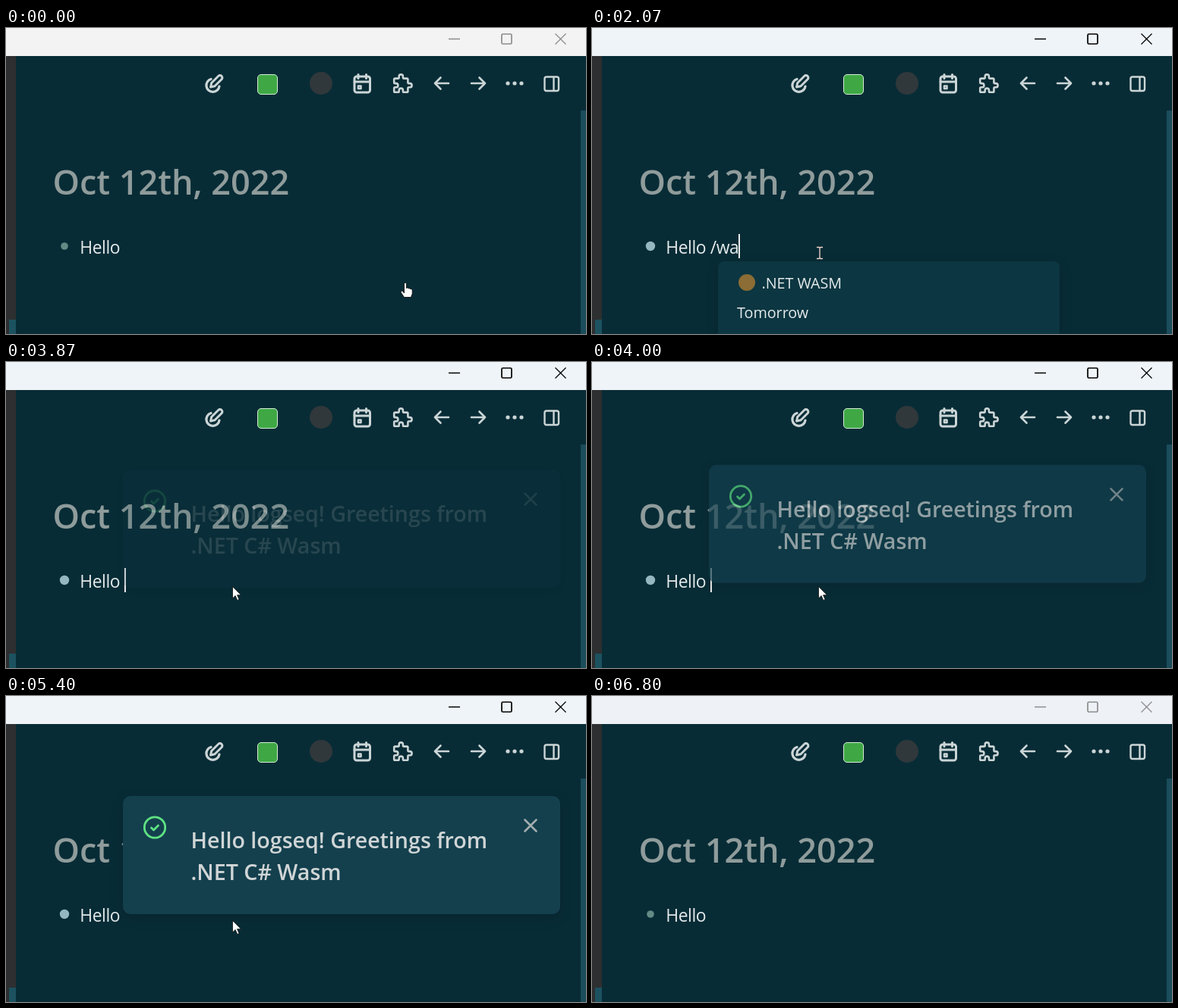
An HTML page for the animation above (6.87 s loop, 764 by 404 pixels).

```html
<!DOCTYPE html>
<html lang="en">
<head>
<meta charset="utf-8">
<title>Slash command</title>
<style>
  html, body { margin: 0; width: 100%; height: 100%; overflow: hidden; background: #082c36; }
  svg { display: block; width: 764px; height: 404px; }
  text { font-family: "Open Sans", "Noto Sans", sans-serif; white-space: pre; }
  .line { fill: none; stroke-linecap: round; stroke-linejoin: round; }
  #buttons { fill: none; stroke-width: 1.3; }
  #tools { stroke: #cbd5d6; stroke-width: 2.6; }
  #title { font-size: 45.1px; font-weight: 600; fill: #8f9c9b; }
  #typed { font-size: 22.8px; letter-spacing: -.4px; fill: #e4ebec; }
  #menu { filter: drop-shadow(0 5px 8px rgba(0, 0, 0, .16)); }
  #menu text { font-size: 19.7px; fill: #e4ebec; }
  #toast { filter: drop-shadow(0 5px 8px rgba(0, 0, 0, .16)); }
  #toast text { font-size: 28.6px; font-weight: 640; fill: #d0d5d6; }
</style>
</head>
<body>
<svg viewBox="0 0 764 404">
  <rect width="764" height="404" fill="#082c36"/>
  <rect y="37" width="13" height="367" fill="#2e2f30"/>
  <rect x="4" y="385" width="9" height="19" fill="#1c5260"/>
  <rect x="757" y="109" width="7" height="295" fill="#1b4d5c"/>
  <rect id="bar" width="764" height="37"/>
  <g id="buttons">
    <path d="M583 14.5h15M723.5 7.5l14 14m0-14l-14 14"/>
    <rect x="653" y="8" width="13" height="13" rx="1.5" stroke-width="1.700"/>
  </g>

  <g id="tools" class="line">
    <path d="M270 67.500a8.600 8.600 0 1 0 11 9.500" stroke-width="3.200"/>
    <path d="M269.500 78l1.200-5.500 9-9a2.800 2.800 0 0 1 4.300 4.300l-9 9z" stroke-width="3"/>
    <rect x="459" y="64" width="20.500" height="21" rx="3" stroke-width="3"/>
    <path d="M464 61.500v5M474.500 61.500v5M459 71h20.500" stroke-width="3"/>
    <rect x="464" y="76.500" width="3.500" height="3.500"/>
    <g transform="translate(507.300 57.500) scale(1.3)" stroke-width="2">
      <path d="M4 7h3a1 1 0 0 0 1-1v-1a2 2 0 0 1 4 0v1a1 1 0 0 0 1 1h3a1 1 0 0 1 1 1v3a1 1 0 0 0 1 1h1a2 2 0 0 1 0 4h-1a1 1 0 0 0-1 1v3a1 1 0 0 1-1 1h-3a1 1 0 0 1-1-1v-1a2 2 0 0 0-4 0v1a1 1 0 0 1-1 1h-3a1 1 0 0 1-1-1v-3a1 1 0 0 1 1-1h1a2 2 0 0 0 0-4h-1a1 1 0 0 1-1-1v-3a1 1 0 0 1 1-1"/>
    </g>
    <path d="M583 73h-18m7.500-7.500l-7.500 7.500 7.500 7.500M613 73h18m-7.500-7.500l7.500 7.500-7.500 7.500"/>
    <path d="M661 73h.01M670 73h.01M679 73h.01" stroke-width="5.200"/>
    <path d="M712 64.500h13.500q2.500 0 2.500 2.500v13.500q0 2.500-2.500 2.500h-13.500q-2.500 0-2.500-2.500v-13.500q0-2.500 2.500-2.500zM721.500 64.500v18" stroke-width="2.400"/>
  </g>
  <rect x="331.500" y="61.500" width="26" height="26" rx="4.500" fill="#3fa845" stroke="#d4ecd6"/>
  <circle cx="415" cy="73" r="15" fill="#30383b"/>

  <text id="title" x="61.500" y="220">Oct 12th, 2022</text>
  <circle id="bullet" cx="77" cy="288"/>
  <text id="typed" x="97.300" y="298"></text>
  <rect id="caret" y="272" width="1.800" height="32" fill="#fff"/>

  <g id="menu">
    <rect x="166" y="308" width="450" rx="8" fill="#0c3641"/>
    <g id="rows"></g>
  </g>

  <g id="toast">
    <rect x="154" y="132" width="576" height="156" rx="10" fill="#14404e"/>
    <g class="line">
      <g stroke="#5fe283" stroke-width="2.800">
        <circle cx="196" cy="173.500" r="13.700"/>
        <path d="M191.500 174l3 3 6-6"/>
      </g>
      <path d="M683.500 163.500l15 15m0-15l-15 15" stroke="#a3adb0" stroke-width="2.600"/>
    </g>
    <text x="243.500" y="201">Hello logseq! Greetings from</text>
    <text x="243.500" y="243">.NET C# Wasm</text>
  </g>

  <g id="pointer">
    <path id="hand" fill="#fff" stroke="#000" stroke-width=".8" stroke-linejoin="round" d="M-2.500 9.500l-4-6c-1-2 1-3 2.500-1.500l1.500 2v-12c0-2 3-2 3 0v5.500c1-1 2.500-.6 2.800.6 1-.8 2.300-.3 2.600.8 1.200-.6 2.300 0 2.300 1.500v4.500l-1.700 4.600z"/>
    <path id="beam" class="line" stroke="#f4d8ce" stroke-width="1.300" d="M-3.500-7.500h2.500l1 1 1-1h2.500M0-6.500v13M-3.500 7.500h2.500l1-1 1 1h2.500"/>
    <path id="arrow" fill="#fff" stroke="#000" stroke-width=".7" d="M-1.500-.5v15.500l3.600-3.500 2.600 6 2.400-1-2.600-5.800h5z"/>
  </g>
</svg>
<script>
const LOOP = 6870;
const $ = id => document.getElementById(id);
const set = (el, attrs) => {
  for (const k in attrs) el.setAttribute(k, attrs[k]);
};
const show = (el, on) => { el.style.visibility = on ? 'visible' : 'hidden'; };
const at = (steps, t) => steps.filter(s => s[0] <= t).pop();

// time, text, caret x
const typing = [
  [0, 'Hello', 156], [1600, 'Hello /', 164.2], [1800, 'Hello /w', 181],
  [2070, 'Hello /wa', 193], [2270, 'Hello /was', 202.5], [2400, 'Hello /wasm', 221],
  [3470, 'Hello /', 164.5], [3800, 'Hello', 156]
];
// time, caret visible
const blinks = [
  [0, 0], [530, 1], [1070, 0], [1600, 1], [2930, 0], [3470, 1],
  [4330, 0], [4870, 1], [5400, 0], [5930, 1], [6470, 0]
];
const NET = '.NET WASM';
// time, menu rows
const menus = [
  [0], [1600, 'Page reference', 'Page embed', 'Block reference'],
  [1870, NET, 'Tomorrow', 'WAITING'], [2130, NET, 'WAITING'], [2330, NET], [3800]
];
// time, bar, buttons, bullet, bullet radius
const looks = [
  [0, '#f3f3f3', '#8c8c8c', '#638a85', 4.8], [530, '#eff4f9', '#000', '#7fa3a8', 5.6],
  [730, '#eff4f9', '#000', '#94b7c0', 6.2], [6800, '#eef1f6', '#8c8c8c', '#638a85', 4.8]
];
// time, pointer shape
const shapes = [[0, 'hand'], [270, 'beam'], [3800, 'arrow'], [5470, 'beam'], [6600, '']];

const move = (x, y) => ({ transform: `translate(${x}px, ${y}px)` });
const play = (el, frames, delay, duration, easing) => {
  const a = el.animate(frames, { delay, duration, easing, fill: 'both' });
  a.pause();
  return a;
};
const arrive = [527, 346], rest = [300, 297], leave = [154, 414];
const path = [
  { ...move(...arrive), offset: 0, easing: 'ease-in-out' },
  { ...move(...rest), offset: 400 / 6460 },
  { ...move(...rest), offset: 6130 / 6460, easing: 'ease-in' },
  { ...move(...leave), offset: 1 }
];
const anims = [
  play($('pointer'), path, 70, 6460, 'linear'),
  play($('toast'), [{ opacity: 0, ...move(0, 12) }, { opacity: 1, ...move(0, 0) }],
    3850, 460, 'cubic-bezier(0, 0, .2, 1)')
];

const row = (name, i) => {
  const y = 336 + 39 * i, mine = name === NET;
  return (mine ? `<circle cx="204" cy="${y}" r="11" fill="#8c6d35"/>` : '') +
    `<text x="${mine ? 223.5 : 191}" y="${y + 8}">${name}</text>`;
};

let menuNow;
function draw(t) {
  anims.forEach(a => { a.currentTime = t; });

  const [, bar, ink, dot, r] = at(looks, t);
  set($('bar'), { fill: bar });
  set($('buttons'), { stroke: ink });
  set($('bullet'), { fill: dot, r });

  const [, text, x] = at(typing, t);
  $('typed').textContent = text;
  set($('caret'), { x });
  show($('caret'), at(blinks, t)[1]);

  const menu = at(menus, t);
  if (menu !== menuNow) {
    menuNow = menu;
    const names = menu.slice(1), n = names.length;
    show($('menu'), n);
    set($('menu').firstElementChild, { height: n > 2 ? 300 : 15 + 39 * n });
    $('rows').innerHTML = names.map(row).join('');
  }

  show($('toast'), t >= 3850 && t < 5470);
  const shape = at(shapes, t)[1];
  for (const el of $('pointer').children) show(el, el.id === shape);
}

const start = performance.now();
function tick() {
  draw((performance.now() - start) % LOOP);
  requestAnimationFrame(tick);
}
tick();
</script>
</body>
</html>
```
